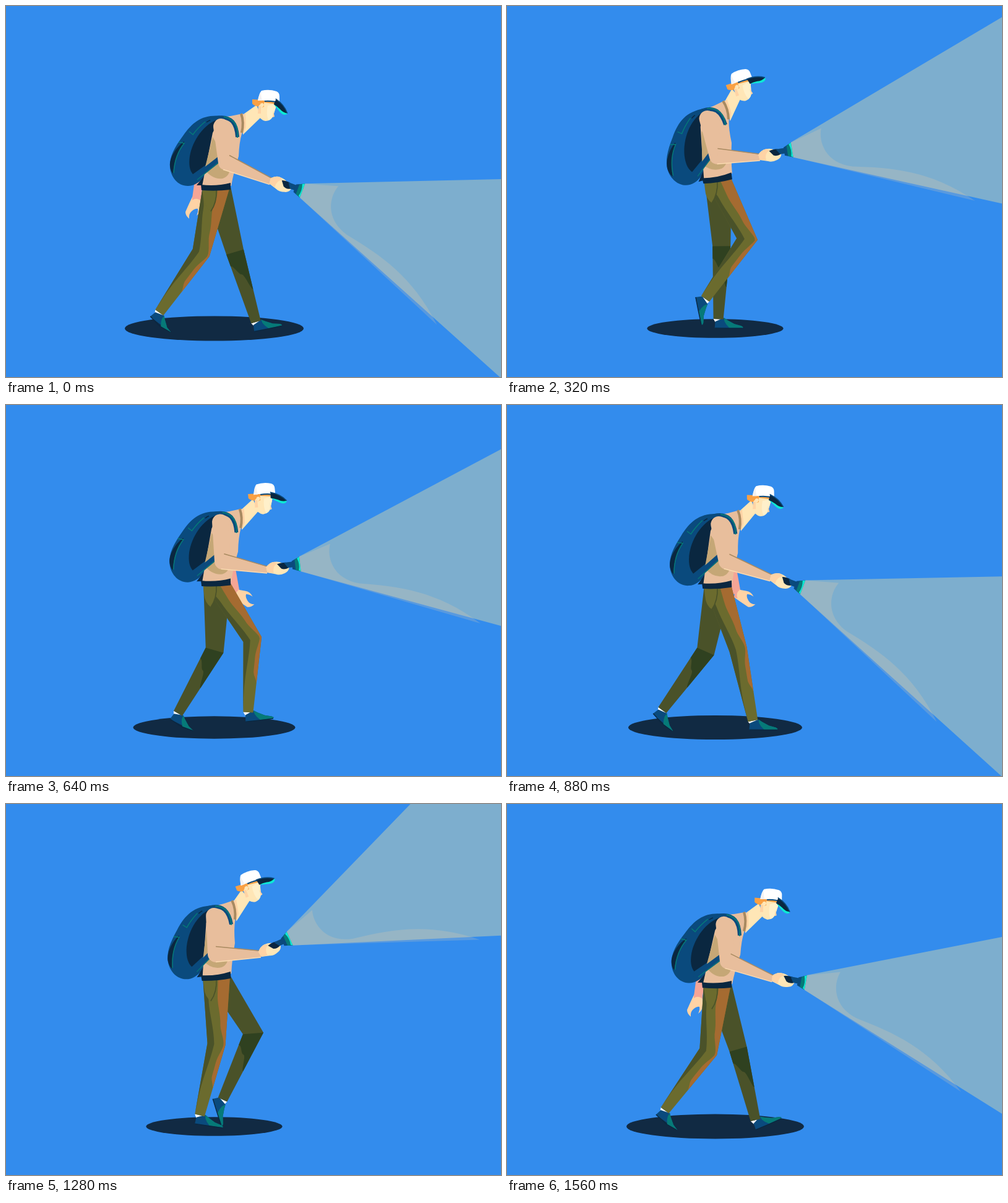
An HTML page with a canvas that plays this animation: 800x600 px, repeating every 1.6 s.

```html
<!DOCTYPE html>
<html lang="en">
<head>
<meta charset="utf-8">
<title>Night walk</title>
<style>
html, body { margin: 0; width: 100%; height: 100%; overflow: hidden; background: #338ced; }
canvas { display: block; }
</style>
</head>
<body>
<canvas id="stage" width="800" height="600"></canvas>
<script>
const ctx = document.getElementById('stage').getContext('2d');
const LOOP = 1600, STEP = 800, TICK = 40, FLOOR = 527;
const C = {
  sky: '#338ced', shadow: '#112a43', navy: '#0a2740', blue: '#0a4a7d', teal: '#067a78', cyan: '#0de9d6',
  olive: '#6b6b2e', moss: '#4a5229', forest: '#2f4120', rust: '#a56b31',
  shirt: '#e8be9c', tan: '#c5a776', seam: '#a98a60', skin: '#ffe6b6', peach: '#ffd3a5', pink: '#f5a596', hair: '#f9a044'
};
const rad = d => d * Math.PI / 180;
const lerp = (a, b, u) => a + (b - a) * u;
const ease = u => u * u * (3 - 2 * u);

// Periodic cubic through (time, value) knots.
function track(times, period, vals) {
  const n = times.length;
  const T = i => times[(i + n) % n] + period * Math.floor(i / n);
  const V = i => vals[(i + n) % n];
  const slope = i => (V(i + 1) - V(i - 1)) / (T(i + 1) - T(i - 1));
  return time => {
    const t = time % period;
    let i = n - 1;
    while (times[i] > t) i--;
    const h = T(i + 1) - T(i), u = (t - T(i)) / h, w = 1 - u;
    return V(i) * (1 + 2 * u) * w * w + slope(i) * h * u * w * w
      + V(i + 1) * u * u * (3 - 2 * u) - slope(i + 1) * h * u * u * w;
  };
}
const perStep = (...v) => track([0, 80, 240, 320, 480, 640, 760], STEP, v);
const perLoop = (...v) => track([0, 320, 640, 880, 1040, 1280, 1560], LOOP, v);
const perStride = (...v) => track([0, 80, 240, 320, 480, 640, 760, 800, 880, 1040, 1120, 1280, 1440, 1560], LOOP, v);

const lean = perStep(0, 3.5, 12.3, 15, 7.3, 1.2, -1.5);
const head = {
  x: perStep(422, 412, 388.5, 381.5, 398.5, 416.5, 424),
  y: perStep(166, 160, 138.5, 133.5, 138.5, 156.5, 167),
  turn: perStep(0, 1, 14, 21, 22, 6, -1),
  brim: perStep(51, 43, 11, -5, -5, 27, 50)
};
const arm = {
  ex: perStep(356, 355, 342, 340, 339, 350, 357),
  ey: perStep(253, 253, 246, 243, 243, 253, 254),
  wx: perStep(428, 427, 416, 409, 412, 423, 430),
  wy: perStep(284, 280, 256, 245, 243, 267, 283),
  aim: perStep(20.3, 20.5, 2.5, -9.1, -24.3, -6.4, 10.5)
};
const farArm = {
  x: perLoop(308, 340, 371, 371, 363, 336, 309),
  y: perLoop(311, 303, 305, 305, 304, 303, 311),
  turn: perLoop(0, -45, -80, -80, -64, -30, 0)
};
const stride = {
  thigh: perStride(-13.5, -10.9, 9.5, 27, 33.5, 33.4, 17.9, 15.9, 18.4, 11.1, 3.1, 0, -2.1, -8),
  calf: perStride(-34.9, -36.4, -42, -35, -24.8, -3.4, 13.7, 16.7, 11.7, 3.9, -2.5, -13.2, -30.1, -36.5),
  foot: perStride(45, 47, 70, 78, 72, -7, -24, -12, 0, 0, 0, 8, 33, 42)
};

function fill(color, d) {
  ctx.fillStyle = color;
  ctx.fill(new Path2D(d));
}
function line(color, width, d, cap = 'butt') {
  ctx.strokeStyle = color;
  ctx.lineWidth = width;
  ctx.lineCap = cap;
  ctx.stroke(new Path2D(d));
}
const path = pts => 'M' + pts.map(p => p[0].toFixed(2) + ' ' + p[1].toFixed(2)).join('L');
const poly = (color, pts) => fill(color, path(pts) + 'Z');
function at(x, y, deg, draw) {
  ctx.save();
  ctx.translate(x, y);
  ctx.rotate(rad(deg));
  draw();
  ctx.restore();
}

// Eased lookup in [[s, k], ...].
const ramp = stops => s => {
  let i = 0;
  while (i < stops.length - 2 && stops[i + 1][0] < s) i++;
  const [a, b] = [stops[i], stops[i + 1]];
  return lerp(a[1], b[1], ease(Math.min(1, Math.max(0, (s - a[0]) / (b[0] - a[0])))));
};
const backShade = ramp([[0, -1], [0.35, -0.65], [1, -0.25], [1.85, -0.95], [2, -1]]);
const frontShade = ramp([[0, 0.13], [0.3, 0.1], [0.7, 0.38], [1, 0.8], [1.25, 0.45], [1.45, 0.42], [1.62, 1], [2, 1]]);
const patchEnd = ramp([[-1, 1.17], [0, 1.32], [1, 1.56]]);

function leg(t, hx, hy, near) {
  const a = rad(stride.thigh(t)), b = rad(stride.calf(t)), f = rad(stride.foot(t)), m = (a + b) / 2;
  const kx = hx + 106 * Math.sin(a), ky = hy + 106 * Math.cos(a);
  const ax = kx + 118 * Math.sin(b), ay = ky + 118 * Math.cos(b);
  const kw = 14.5 / Math.cos((a - b) / 2);
  const joints = [
    k => [hx + 22 * k, hy - 4],
    k => [kx + kw * k * Math.cos(m), ky - kw * k * Math.sin(m)],
    k => [ax + 8 * k * Math.cos(b), ay - 8 * k * Math.sin(b)]
  ];
  // s runs hip 0, knee 1, ankle 2; k runs back -1 to front 1.
  const P = (s, k) => {
    const i = s < 1 ? 0 : 1, p = joints[i](k), q = joints[i + 1](k);
    return [lerp(p[0], q[0], s - i), lerp(p[1], q[1], s - i)];
  };
  const F = (x, y) => [
    ax + x * Math.cos(f) - y * Math.sin(f),
    Math.min(FLOOR, ay + x * Math.sin(f) + y * Math.cos(f))
  ];
  const sweep = (n, from, to, fn) => Array.from({ length: n + 1 }, (_, i) => fn(lerp(from, to, i / n)));

  poly('#fff', [P(2, -1), P(2, 1), F(9, 1), F(-5, 5)]);
  poly(C.blue, [F(-5, 4), F(9, -2), F(15, 2), F(26, 8), F(37, 11), F(40, 13), F(39, 15), F(-6, 15)]);
  poly(C.teal, [F(9, -2), F(15, 2), F(26, 8), F(37, 11), F(40, 13), F(39, 14.5), F(18, 14.5), F(13, 9), F(10, 4)]);
  line(C.navy, 1.4, path([F(-6, 14.6), F(16, 15), F(39, 15)]));

  poly(near ? C.olive : C.moss, [P(0, -1), P(1, -1), P(2, -1), P(2, 1), P(1, 1), P(0, 1)]);
  if (near) {
    const back = sweep(40, 0, 2, s => P(s, backShade(s)));
    poly(C.moss, [...back, P(1, -1), P(0, -1)]);
    const front = sweep(40, 0, 1.62, s => P(s, frontShade(s)));
    poly(C.rust, [...front, P(1, 1), P(0, 1)]);
  } else {
    poly(C.forest, [P(1, -1), P(1, 1), ...sweep(14, 1, -1, k => P(patchEnd(k), k))]);
  }
}

function drawFarArm(t) {
  const x = farArm.x(t), y = farArm.y(t);
  line(C.pink, 14, path([[338 + (x - 338) * 0.8, 268], [x, y]]));
  at(x, y, farArm.turn(t), () => {
    fill(C.peach, 'M-7 -2Q-11 6 -18 22Q-18 28 -12 33Q-13 25 -8 21Q-2 16 2 17Q3 22 0 28Q7 23 7 15V-2Z');
    fill(C.pink, 'M-7 -3H7V4Q0 -2 -7 3Z');
  });
}

function drawTorso() {
  fill(C.blue, 'M348 178C318 175 302 187 286 210C272 229 264 244 265 260C266 276 277 291 294 291C304 291 312 285 322 276L352 200Z');
  fill(C.navy, 'M344 183C320 190 301 218 297 243C295 257 297 266 302 272L323 257L340 205Z');
  fill(C.navy, 'M288 219C274 229 264 246 265 259Q266 267 270 271C272 252 276 237 288 222Z');
  line(C.teal, 1.5, 'M279 220L288 222C276 237 272 252 271 270');
  line(C.teal, 1.5, 'M296 203L302 208Q310 197 322 187');
  line(C.navy, 1.5, 'M324 188Q332 182 345 182');
  fill(C.navy, 'M308 290L326 268V290Z');

  fill(C.shirt, 'M347 180Q366 178 383 174Q386 190 381 207Q377 220 376 243Q368 268 364 291L317 291Q325 250 334 205Z');
  fill(C.tan, 'M334 212L321 264Q333 281 350 279Q363 275 362 258Z');
  line(C.seam, 4, 'M380 174Q385 188 381 205');
  line(C.blue, 9, 'M302 281L347 246');
  line(C.teal, 1.2, 'M309 281L346 251');
  line(C.blue, 6, 'M330 184Q354 175 366 187Q373 195 374 212');
  line(C.teal, 2, 'M352 179Q367 182 372 194Q375 201 374 213');
}

function drawHead(t) {
  at(head.x(t), head.y(t), -head.turn(t), () => {
    fill(C.hair, 'M-24 -15L-5 -14L-3 -7L-12 -3Q-21 -4 -24 -8Z');
    fill(C.skin, 'M-14 -4L-6 -12L17 -9L14 -2L11 8Q8 20 -3 20Q-12 18 -15 8Z');
    fill(C.peach, 'M-14 -4L-10 -4L-10 8L-15 8Z');
    fill('#fff0ca', 'M1 -5Q-2 8 2 19Q9 17 11 7L14 -2L16 -8Z');
    fill(C.peach, 'M10 4L12 13L9 14Z');
    fill(C.hair, 'M-23 -14L17 -10L17 -7L-5 -10L-5 -3L-9 -2L-11 -8Z');
    fill(C.skin, 'M-11 -8Q-6 -11 -5 -6Q-6 -2 -10 -2Z');
    fill('#fff', 'M-15 -13Q-13 -25 -9 -29Q3 -32 15 -28Q20 -26 20 -20V-9Q3 -14 -15 -13Z');
    fill('#f3f1f1', 'M-15 -13Q-13 -22 -10 -27Q-10 -19 -8 -13Z');
    line(C.blue, 2, 'M-4 -12Q9 -13 20 -9');
  });
  const r = rad(-head.turn(t));
  const bx = head.x(t) + 18 * Math.cos(r) + 9 * Math.sin(r);
  const by = head.y(t) + 18 * Math.sin(r) - 9 * Math.cos(r);
  at(bx, by, head.brim(t), () => {
    fill(C.cyan, 'M-3 1Q10 -5 23 0Q22 7 12 7Q3 7 -1 7Z');
    fill(C.navy, 'M-7 -1Q8 -6 22 -1Q17 4 9 4Q2 5 -3 7Z');
    line(C.blue, 1.6, 'M-8 -1Q8 -6 22 -1');
  });
}

function drawArm(t, shoulder) {
  const ex = arm.ex(t), ey = arm.ey(t), wx = arm.wx(t), wy = arm.wy(t), aim = arm.aim(t);
  const a = Math.atan2(wy - ey, wx - ex);
  const E = d => [ex - d * Math.sin(a), ey + d * Math.cos(a)];
  const W = d => [wx - d * Math.sin(a), wy + d * Math.cos(a)];
  line(C.shirt, 26, path([shoulder, [ex, ey]]), 'round');
  poly(C.shirt, [E(-12.5), W(-5), W(5), E(12.5)]);
  line(C.seam, 1.5, path([E(-12.5), W(-5.5)]));
  line('#fbdab0', 1.5, path([E(12.5), W(5)]));

  at(wx, wy, aim, () => {
    fill(C.skin, 'M-2 -5Q4 -12 12 -12Q20 -12 24 -9L35 -1Q34 6 27 8Q18 11 12 8L-1 4Z');
    fill(C.peach, 'M-2 -5Q4 -12 12 -12L17 -9Q8 -6 9 6L-1 4Z');
    fill(C.navy, 'M16 -8Q22 -10 30 -9L34 0Q27 3 22 0Z');
    fill(C.blue, 'M27 -9H42V0H33Z');
    fill(C.blue, 'M40 -10L53 -16V8L40 3Z');
    fill(C.teal, 'M45 -12L53 -16V8L45 5Z');
    fill(C.cyan, 'M49 -14L53 -16V8L50 6Q53 -4 49 -14Z');
    ctx.translate(53, -4);
    fill('rgba(254,232,151,.36)', 'M0 -12.2L800 -329V329L0 12.2Z');
    fill('rgba(255,210,159,.19)', 'M0 -12L52 -27C44 -6 50 30 92 42C155 54 215 68 279 128L0 12Z');
  });
}

function draw(t) {
  const u = (t % STEP) / 400, rise = ease(u < 1 ? u : 2 - u);
  const lift = 15 * rise, px = 338, py = 288 - lift, tilt = lean(t), r = rad(-tilt);
  const onTorso = (x, y) => [
    px + (x - 338) * Math.cos(r) - (y - 288) * Math.sin(r),
    py + (x - 338) * Math.sin(r) + (y - 288) * Math.cos(r)
  ];
  const h = rad(-head.turn(t));
  const onHead = (x, y) => [
    head.x(t) + x * Math.cos(h) - y * Math.sin(h),
    head.y(t) + x * Math.sin(h) + y * Math.cos(h)
  ];

  ctx.fillStyle = C.sky;
  ctx.fillRect(0, 0, 800, 600);
  const rx = 144.5 - 38.4 * rise;
  ctx.fillStyle = C.shadow;
  ctx.beginPath();
  ctx.ellipse(336.5, 521.5, rx, rx * 0.139, 0, 0, 7);
  ctx.fill();

  drawFarArm(t);
  leg(t + STEP, 341, 296 - lift, false);
  leg(t, 340, 296 - lift, true);
  at(0, -lift, 0, () => {
    fill(C.olive, 'M318 292H342Q342 318 331 332Q321 325 320 310Z');
    line(C.moss, 1.6, 'M340 297Q341 318 331 332');
  });

  poly(C.skin, [onTorso(381, 177), onHead(-17, -6), onHead(-10, 14), onTorso(383, 208)]);
  poly(C.peach, [onTorso(381, 177), onTorso(387, 173), onTorso(388, 196), onTorso(383, 208)]);
  at(px, py, -tilt, () => {
    ctx.translate(-338, -288);
    drawTorso();
  });
  at(px, py, -tilt / 2, () => fill(C.navy, 'M-23 1Q2 4 25 -2V9Q2 12 -22 10Z'));
  drawHead(t);
  drawArm(t, onTorso(348, 195));
}

function frame() {
  const t = performance.now() % LOOP;
  draw(Math.floor(t / TICK) * TICK);
  requestAnimationFrame(frame);
}
frame();
</script>
</body>
</html>
```
